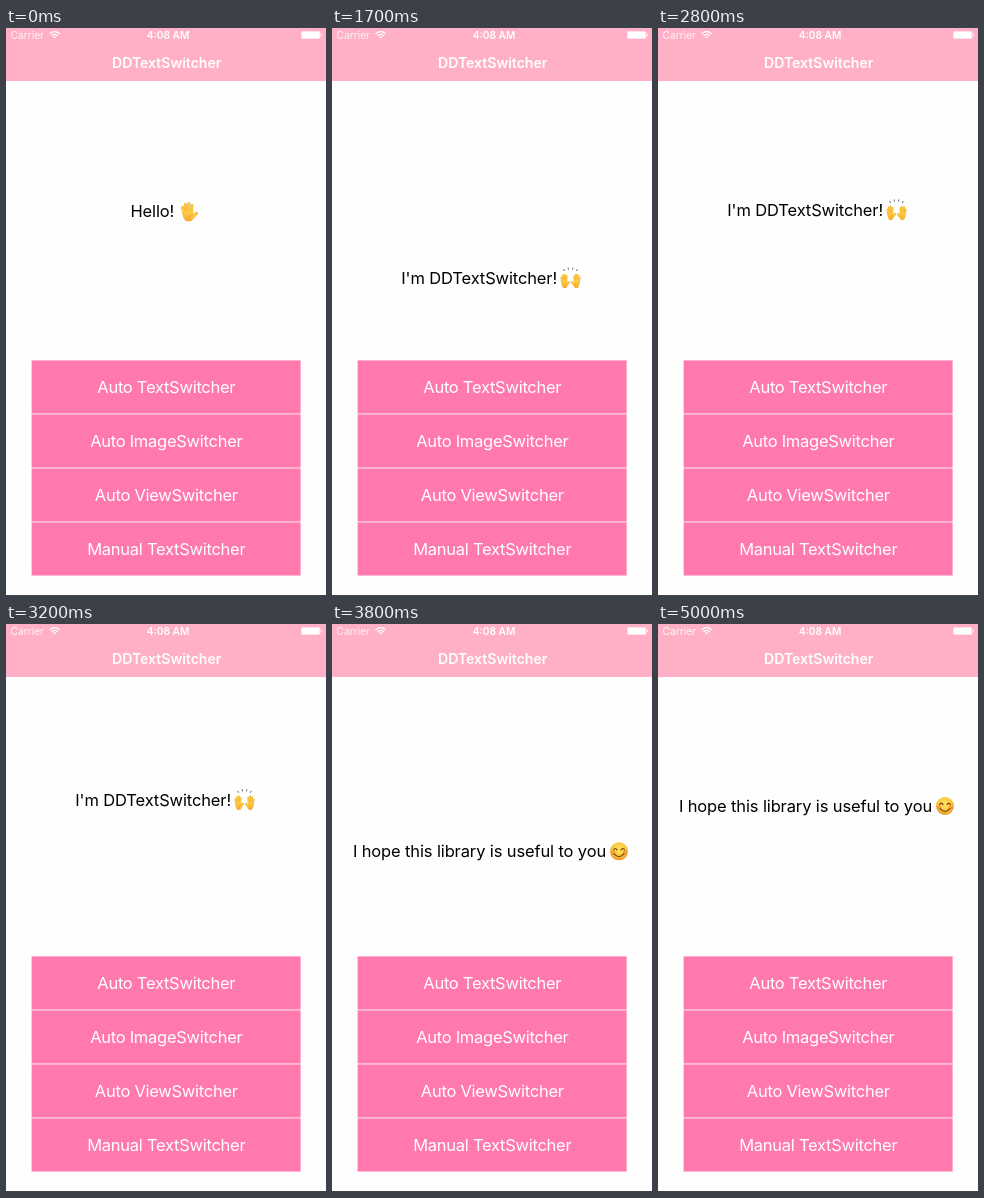
These frames come from a looping animation (320x568 px, 5.1 s). An HTML page:

```html
<!DOCTYPE html>
<html lang="en">
<head>
<meta charset="utf-8">
<title>DDTextSwitcher</title>
<style>
  html, body { margin: 0; width: 100%; height: 100%; overflow: hidden; background: #fefefe; }
  svg { display: block; width: 320px; height: 568px; font-family: Inter, Roboto, sans-serif; }
  .label { font-size: 16.5px; letter-spacing: -.13px; fill: #000; }
  .nav { fill: #ffb0c6; }
  .title { font-size: 14.05px; font-weight: 600; fill: #fff; text-anchor: middle; }
  .status { font-size: 10.2px; fill: #fff; }
  .time { font-weight: 600; text-anchor: middle; }
  .button rect { fill: #ff79ae; }
  .button text { font-size: 16.5px; letter-spacing: -.27px; fill: #fff; text-anchor: middle; }
  .line { fill: none; stroke-linecap: round; stroke-linejoin: round; }
</style>
</head>
<body>
<svg viewBox="0 0 320 568">
  <defs>
    <clipPath id="window"><rect y="52" width="320" height="282"/></clipPath>
    <radialGradient id="face" cx=".5" cy=".4" r=".6">
      <stop offset="0" stop-color="#ffe565"/>
      <stop offset=".6" stop-color="#fdca3e"/>
      <stop offset="1" stop-color="#e8932a"/>
    </radialGradient>
    <linearGradient id="skin" x2="0" y2="1">
      <stop offset="0" stop-color="#ffd34a"/>
      <stop offset="1" stop-color="#f6ad2c"/>
    </linearGradient>
    <path id="fingers" d="M177.7 184 L176.5 178.6 M180.1 184 L179.2 175.6 M182.8 184 V174.7 M185.4 184 L186 176.6 M186 189 L190.5 184.4"/>
    <g id="hand" class="line">
      <use href="#fingers" stroke="#e5a030" stroke-width="2.8"/>
      <path d="M176.4 182 Q181.5 180.5 186.7 182 L186.9 185.6 L188.3 185.4 Q187.6 190.6 184.8 192 H180.2 Q177 189.5 176.4 182Z"
        fill="url(#skin)" stroke="#e5a030" stroke-width=".5"/>
      <use href="#fingers" stroke="#ffc93f" stroke-width="2.2"/>
      <path d="M186 185.6 Q183.8 186.4 183.8 189" stroke="#dc9129" stroke-width=".6"/>
    </g>
    <g id="raised" class="line">
      <use href="#hand" transform="translate(129 46.5) scale(.56 .757)"/>
      <path d="M231 174.6 L230.3 173.4 M234.9 173.2 L234.7 171.9" stroke="#555" stroke-width=".9"/>
    </g>
  </defs>

  <g clip-path="url(#window)">
    <g id="hello">
      <text class="label" x="124.4" y="188">Hello!</text>
      <use href="#hand"/>
    </g>

    <g id="name">
      <text class="label" x="69.3" y="188">I'm DDTextSwitcher!</text>
      <use href="#raised" transform="translate(1.5 0)"/>
      <use href="#raised" transform="translate(475.5 0) scale(-1 1)"/>
    </g>

    <g id="hope">
      <text class="label" x="20.9" y="188">I hope this library is useful to you</text>
      <circle cx="287" cy="182" r="9" fill="url(#face)"/>
      <circle cx="281.3" cy="183.6" r="2.1" fill="#f4793a" opacity=".6"/>
      <circle cx="292.7" cy="183.6" r="2.1" fill="#f4793a" opacity=".6"/>
      <path class="line" d="M281.6 180.6 Q283.3 177.8 285 180.6 M289 180.6 Q290.7 177.8 292.4 180.6 M282.2 184.6 Q287 190 291.8 184.6"
        stroke="#70400f" stroke-width="1.2"/>
    </g>
  </g>

  <rect class="nav" width="320" height="53"/>
  <text class="status" x="4.6" y="11" opacity=".85">Carrier</text>
  <g transform="translate(48.6 10.5)">
    <path class="line" d="M-4.7 -4.9 A6.7 6.7 0 0 1 4.7 -4.9 M-2.8 -2.9 A4 4 0 0 1 2.8 -2.9" stroke="#fff" stroke-width="1.3"/>
    <path d="M0 0 L-1.6 -1.7 Q0 -3 1.6 -1.7Z" fill="#fff"/>
  </g>
  <text class="status time" x="162" y="11">4:08 AM</text>
  <g fill="#fff">
    <rect x="295" y="3" width="19.4" height="8" rx="1.6" opacity=".6"/>
    <rect x="296" y="4" width="17.4" height="6" rx=".8"/>
    <path d="M315 5.4 Q317 7 315 8.6Z"/>
  </g>
  <text class="title" x="160.7" y="39.8">DDTextSwitcher</text>

  <g id="menu"></g>
  <rect y="567" width="320" height="1" fill="#444"/>
</svg>
<script>
  const LOOP = 5100, STEP = 100, SLIDE = 1000, TRAVEL = 259;

  const menu = document.getElementById('menu');
  ['Auto TextSwitcher', 'Auto ImageSwitcher', 'Auto ViewSwitcher', 'Manual TextSwitcher'].forEach((caption, row) => {
    menu.innerHTML += `<g class="button" transform="translate(25.6 ${332.4 + 54 * row})">
      <rect width="269" height="53.1"/><text x="134.7" y="32.6">${caption}</text></g>`;
  });

  const labels = [
    { id: 'hello', enter: -957, leave: 1055 },
    { id: 'name', enter: 1055, leave: 3090 },
    { id: 'hope', enter: 3090, leave: Infinity },
  ].map(label => ({ ...label, node: document.getElementById(label.id) }));

  // Same curve as CSS ease-in-out: cubic-bezier(.42, 0, .58, 1)
  function easeInOut(x) {
    if (x <= 0) return 0;
    if (x >= 1) return 1;
    let low = 0, high = 1, u;
    for (let i = 0; i < 24; i++) {
      u = (low + high) / 2;
      const at = 1.26 * u * (1 - u) ** 2 + 1.74 * u * u * (1 - u) + u ** 3;
      if (at < x) low = u; else high = u;
    }
    return u * u * (3 - 2 * u);
  }

  const progress = (time, start) => easeInOut((time - start) / SLIDE);

  function draw(now) {
    const time = Math.floor((now % LOOP) / STEP) * STEP;
    for (const { node, enter, leave } of labels) {
      const shift = TRAVEL * (1 - progress(time, enter) - progress(time, leave));
      node.setAttribute('transform', `translate(0 ${shift.toFixed(2)})`);
    }
  }

  const origin = performance.now();
  function tick() {
    draw(performance.now() - origin);
    requestAnimationFrame(tick);
  }
  tick();
</script>
</body>
</html>
```
